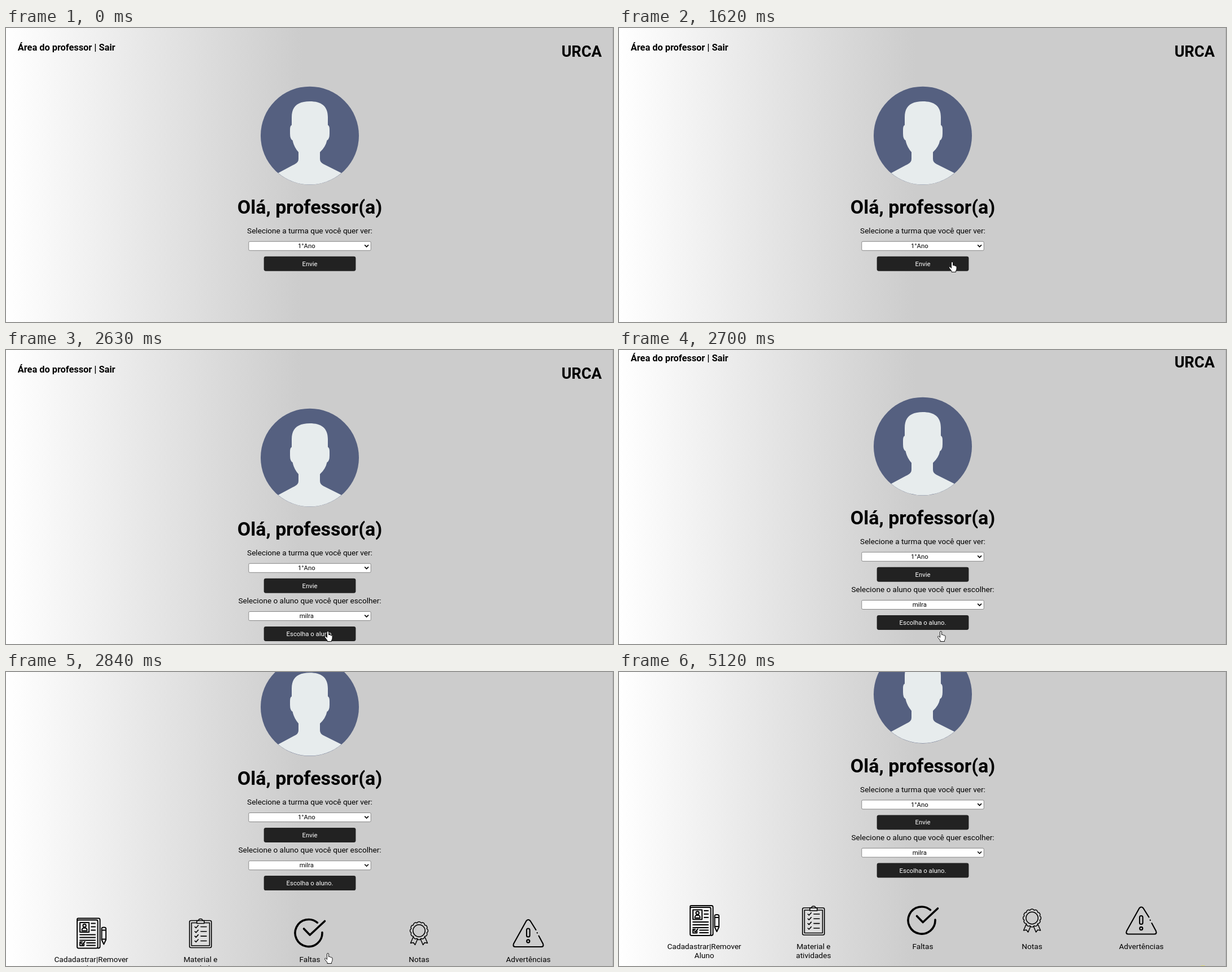
These frames come from a looping animation (1075 by 521 pixels, 5190 ms). An HTML page:

```html
<!DOCTYPE html>
<html lang="pt">
<head>
<meta charset="utf-8">
<title>Área do professor</title>
<style>
  html, body { margin: 0; width: 100%; height: 100%; overflow: hidden; background: #ccc; }
  svg { display: block; width: 1075px; height: 521px; font-family: Roboto, Arial, sans-serif; }
  .bold { font-weight: 700; }
  .mid { text-anchor: middle; }
  .body { font-size: 13.6px; }
  .small { font-size: 11.33px; }
  .icon { fill: none; stroke: #000; stroke-linecap: round; stroke-linejoin: round; }
</style>
</head>
<body>
<svg viewBox="0 0 1075 521">
  <defs>
    <linearGradient id="shade" gradientUnits="userSpaceOnUse" x1="0" y1="0" x2="525" y2="0">
      <stop offset="0" stop-color="#fff"/>
      <stop offset="1" stop-color="#ccc"/>
    </linearGradient>
  </defs>
  <rect width="1075" height="521" fill="url(#shade)"/>

  <g id="page">
    <text class="bold" x="20.8" y="40" font-size="16.32">Área do professor | Sair</text>
    <text class="bold" x="1055" y="51" font-size="27.2" text-anchor="end">URCA</text>

    <circle cx="538" cy="190.7" r="87" fill="#556080"/>
    <path fill="#e7eced" d="M482 257 L512 241 Q518 238 518 232 V220 Q510 211 507.500 199
      Q503 197 503 187 V180 Q503 173 506 172 V158 C506 138 518 130 538 130
      C558 130 570 138 570 158 V172 Q573 173 573 180 V187 Q573 197 568.500 199
      Q566 211 556 220 V232 Q556 238 562 241 L594 257 A87 87 0 0 1 482 257Z"/>

    <text class="bold mid" x="538" y="329" font-size="34">Olá, professor(a)</text>
    <g id="forms"></g>
    <g id="menu" transform="translate(0 151.3)">
      <g class="icon" stroke-width="1.9">
        <rect x="126" y="417" width="36.500" height="50" rx="2.500"/>
        <path d="M128 414 H164 Q166.500 414 166.500 417 V464 Q166.500 467 163 467 M126 420 V416 Q126 414 128 414"/>
        <rect x="131" y="421.500" width="16" height="17"/>
        <circle cx="139" cy="427" r="2.700"/>
        <path d="M134.500 436 V434 Q135 431 139 431 Q143 431 143.500 434 V436Z"/>
        <path d="M151 423 H158 M151 429 H158 M151 435 H158 M131 443 H158 M131 448 H158 M131 453 H158 M143 457.500 H158 M143 462 H158"/>
        <path d="M138 459 V462.500 H131 V456 H135 M133 458 L135 460.500 L139.500 455.500"/>
        <path d="M169.500 452 V432 Q169.500 430 173.200 430 Q177 430 177 432 V452 L173.200 460Z M169.500 435 H177 M169.500 451 H177"/>
      </g>
      <g class="icon" stroke-width="1.6">
        <rect x="325" y="418" width="38.800" height="48" rx="2.500"/>
        <path d="M337 422 H328.500 V462.500 H360.500 V422 H352"/>
        <path d="M338 423 V418 H341 Q341 415 344.500 415 Q348 415 348 418 H351 V423Z"/>
        <path id="checks"/>
      </g>
      <g class="icon" stroke-width="3.6">
        <path d="M551.400 421.600 A24 24 0 1 0 560 439"/>
        <path d="M527.500 432.500 L538.200 443.500 L564.500 419"/>
      </g>
      <g class="icon" stroke-width="1.5">
        <path id="rosette"/>
        <circle cx="731.500" cy="436" r="10.700"/>
        <path d="M721 447.500 L716.500 458 L721.500 457 L724.500 461 L729 450.500 M742 447.500 L746.500 458 L741.500 457 L738.500 461 L734 450.500"/>
      </g>
      <g class="icon" stroke-width="2.1">
        <path d="M938.500 434.500 L928.500 418.500 Q925 414.500 921.500 418.500 L899 459 Q897 464.500 902 464.500
          H948 Q953 464.500 951 459 L943.500 445 M940.700 439.500 L940.900 440"/>
        <rect x="922" y="432" width="5.600" height="15" rx="2.800"/>
        <circle cx="924.800" cy="454.500" r="2.600"/>
      </g>
    </g>
  </g>

  <path d="M1074.500 0 V521" stroke="#b4b4b4"/>
  <ellipse id="glow" cx="1034" cy="522" rx="5" ry="2" fill="#e2dc62"/>
  <g id="cursor" fill="#fff" stroke="#000" stroke-width=".9" stroke-linejoin="round">
    <path id="arrow" d="M0 0 V14.300 L3.300 11.300 L5.500 16 L7.800 15 L5.700 10.400 H10.300Z"/>
    <path id="hand" d="M-1.500 1.300 Q-1.500 0 0 0 Q1.500 0 1.500 1.300 V6.300 Q4 5.200 4.300 6.900 Q6.200 6.200 6.500 7.700
      Q8 7.200 8 9 V12 Q8 14 6.500 16 V18 H-1 V16.300 L-5 11 Q-6.300 9 -4.700 8.600 Q-3.500 8.300 -1.500 11Z"/>
  </g>
</svg>

<script>
const LOOP = 5190, STEP = 70;
const $ = id => document.getElementById(id);

function text(x, y, cls, value, fill = '#000') {
  return `<text class="mid ${cls}" x="${x}" y="${y}" fill="${fill}">${value}</text>`;
}

function form(id, dy, label, option, button) {
  return `<g id="${id}" transform="translate(0 ${dy})">
    ${text(538, 364, 'body', label)}
    <rect x="429.8" y="378.300" width="216.400" height="16" rx="2" fill="#fff" stroke="#767676" stroke-width=".85"/>
    ${text(532.3, 390, 'small', option)}
    <path d="M635.200 384.400 l3.400 3.400 l3.400 -3.400" fill="none" stroke="#000" stroke-width="1.6"/>
    <rect x="456.700" y="404.700" width="162.700" height="26" rx="3.400" fill="#222"/>
    ${text(538, 421.7, 'small', button, '#fff')}</g>`;
}

$('forms').innerHTML =
  form('classForm', 0, 'Selecione a turma que você quer ver:', '1°Ano', 'Envie') +
  form('pupilForm', 85.2, 'Selecione o aluno que você quer escolher:', 'milra', 'Escolha o aluno.');

const labels = [['Cadadastrar|Remover', 'Aluno'], ['Material e', 'atividades'], ['Faltas'], ['Notas'], ['Advertências']];
$('menu').insertAdjacentHTML('beforeend', labels.map((lines, i) =>
  lines.map((line, row) => text(151 + 193.5 * i, 491 + 16.4 * row, 'body', line)).join('')).join(''));

$('checks').setAttribute('d', [429, 437.3, 445.6, 454].map(y =>
  `M334.500 ${y} l2 2 l4 -4.500 M345 ${y} h10`).join(''));

const petals = 12;
$('rosette').setAttribute('d', Array.from({ length: petals + 1 }, (_, i) => {
  const a = (i + 0.5) / petals * 2 * Math.PI;
  const p = `${731.5 + 14.2 * Math.cos(a)} ${436 + 14.2 * Math.sin(a)}`;
  return i ? `A4.100 4.100 0 0 1 ${p}` : `M${p}`;
}).join(''));

// Spans of screen activity; the picture holds still between them.
const spans = [[0, 0], [260, 740], [810, 1280], [1550, 2020], [2090, 2500], [2630, 2910], [3570, 3710], [5120, 5120]];
const path = [
  [260, 986, 512], [400, 880, 473], [540, 755, 437], [680, 655, 418], [740, 639.5, 415],
  [880, 618, 403], [1020, 594, 408], [1150, 588, 416], [1280, 590, 414.5],
  [1690, 590, 414.5], [1830, 584, 430], [2020, 572, 464], [2230, 567, 480], [2500, 570, 498.5],
  [3500, 570, 498.5], [3570, 590, 503], [3640, 621, 511], [3710, 650, 522]
];
const scroll = [[2630, 0], [2700, 20], [2770, 72.4], [2840, 128.8], [2910, 151.3]];

function hold(t) {
  const [start, end] = spans.filter(s => s[0] <= t).pop();
  return t >= end ? end : start + Math.floor((t - start) / STEP) * STEP;
}

function sample(keys, t, k) {
  if (t <= keys[0][0]) return keys[0][k];
  const i = keys.findIndex(key => key[0] > t);
  if (i < 0) return keys[keys.length - 1][k];
  const a = keys[i - 1], b = keys[i];
  return a[k] + (b[k] - a[k]) * (t - a[0]) / (b[0] - a[0]);
}

function show(id, on) {
  $(id).setAttribute('visibility', on ? 'visible' : 'hidden');
}

function render(time) {
  const t = hold(time);
  const x = sample(path, t, 1), y = sample(path, t, 2);
  const visible = t >= 260 && t < 3710;
  const onButton = t < 3570 && x > 457 && x < 619 && (y > 490 || (y > 404 && y < 431));
  $('page').setAttribute('transform', `translate(0 ${-sample(scroll, t, 1)})`);
  $('cursor').setAttribute('transform', `translate(${x} ${y})`);
  show('arrow', visible && !onButton);
  show('hand', visible && onButton);
  show('pupilForm', t >= 1760);
  show('glow', t >= 5120);
}

const begin = performance.now();
function tick() {
  render((performance.now() - begin) % LOOP);
  requestAnimationFrame(tick);
}
tick();
</script>
</body>
</html>
```
